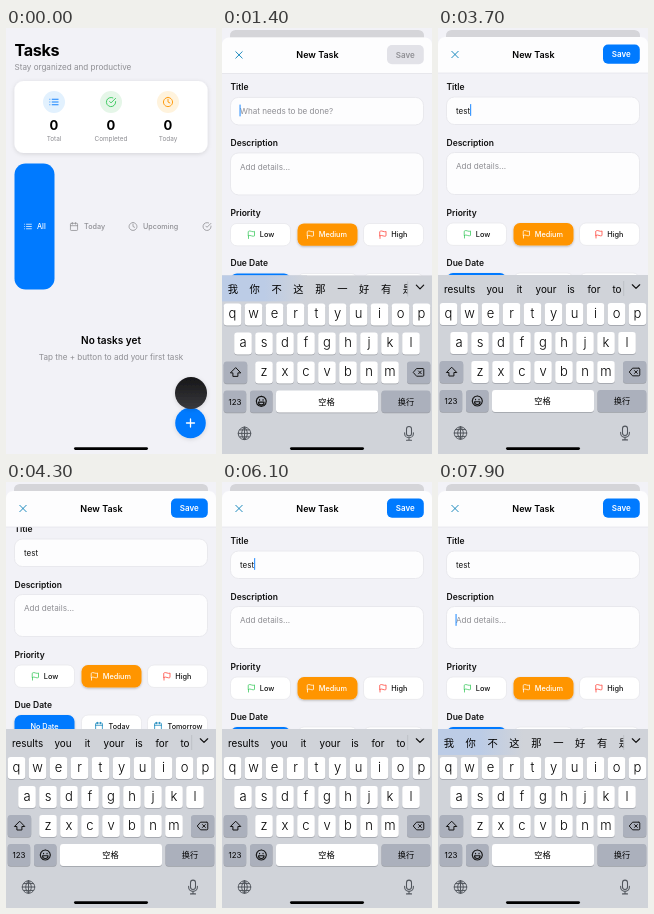
An HTML page for the animation above (8000 ms loop, 210 by 426 pixels).

```html
<!DOCTYPE html>
<html lang="en">
<head>
<meta charset="utf-8">
<title>Tasks</title>
<style>
  html, body { margin: 0; width: 100%; height: 100%; overflow: hidden; background: #f2f2f7; }
  svg { display: block; width: 100vw; height: 100vh; }
  text { font-family: Inter, "Noto Sans CJK SC", "Noto Sans CJK", sans-serif; white-space: pre; }
</style>
</head>
<body>
<svg id="stage" viewBox="0 0 210 426"></svg>
<script>
const BLUE = '#007aff', GREEN = '#34c759', ORANGE = '#ff9500', RED = '#ff3b30', GRAY = '#8e8e93';
const TEAL = '#0a80b8', KEYS_BG = '#d0d3d9', KEY_DARK = '#abb0bc';

const ring = 'M12 2a10 10 0 1 0 .01 0';
const icons = {
  list: 'M8 6h13M8 12h13M8 18h13M3 6h.01M3 12h.01M3 18h.01',
  check: 'M22 11v1a10 10 0 1 1-5.9-9.1M22 4 12 14l-3-3',
  clock: ring + 'M12 6v6l4 2',
  cal: 'M5 4h14a2 2 0 0 1 2 2v14a2 2 0 0 1-2 2H5a2 2 0 0 1-2-2V6a2 2 0 0 1 2-2M16 2v4M8 2v4M3 10h18',
  flag: 'M4 15s1-1 4-1 5 2 8 2 4-1 4-1V3s-1 1-4 1-5-2-8-2-4 1-4 1zM4 22v-7',
  close: 'M19 5 5 19M5 5l14 14',
  plus: 'M12 4v16M4 12h16',
  down: 'M4 8l8 8 8-8',
  globe: ring + 'M2 12h20M12 2v20M12 2c-6 6-6 14 0 20 6-6 6-14 0-20M4.5 6.5h15M4.5 17.5h15',
  mic: 'M12 1a4 4 0 0 0-4 4v7a4 4 0 0 0 8 0V5a4 4 0 0 0-4-4M5 11v1a7 7 0 0 0 14 0v-1M12 19v4M8 23h8',
  shift: 'M12 3 2 13h5v7h10v-7h5z',
  erase: 'M21 4H8l-7 8 7 8h13a2 2 0 0 0 2-2V6a2 2 0 0 0-2-2M18 9l-6 6M12 9l6 6',
  face: ring + 'M6.5 13.5h11a5.5 5.5 0 0 1-11 0M8.5 8.5v1M15.5 8.5v1'
};

// Markup helpers
const text = (s, x, y, size, fill = '#000', weight = 400, anchor = 'start', more = '') =>
  `<text x="${x}" y="${y}" font-size="${size}" fill="${fill}" font-weight="${weight}" text-anchor="${anchor}" ${more}>${s}</text>`;
const mid = (s, x, y, size, fill, weight) => text(s, x, y, size, fill, weight, 'middle');
const box = (x, y, w, h, r, fill, more = '') =>
  `<rect x="${x}" y="${y}" width="${w}" height="${h}" rx="${r}" fill="${fill}" ${more}/>`;
const dot = (x, y, r, fill, more = '') => `<circle cx="${x}" cy="${y}" r="${r}" fill="${fill}" ${more}/>`;
const icon = (name, x, y, size, color, width = 2) =>
  `<path d="${icons[name]}" transform="translate(${x - size / 2} ${y - size / 2}) scale(${size / 24})"
    fill="none" stroke="${color}" stroke-width="${width}" stroke-linecap="round" stroke-linejoin="round"/>`;
const field = (y, h) => box(8.5, y, 193, h, 8, '#fdfdfe', 'stroke="#e5e5ea" stroke-width=".8"');

function listPage() {
  const stat = (x, name, color, tint, label) =>
    dot(x, 74, 11, tint) + icon(name, x, 74, 11, color) +
    mid('0', x, 102, 13, '#000', 700) + mid(label, x, 113, 6.4, GRAY);
  const tab = (x, name, label) => icon(name, x, 198.5, 9.5, GRAY) + text(label, x + 10, 201, 7.2, GRAY, 500);
  return text('Tasks', 8.5, 28, 16.2, '#000', 700, 'start', 'letter-spacing="-.35"') +
    text('Stay organized and productive', 8.5, 42, 8.1, GRAY) +
    box(8.5, 53, 193, 72, 9, '#fff', 'filter="url(#soft)"') +
    stat(48, 'list', BLUE, '#e2f1fe', 'Total') +
    stat(105, 'check', GREEN, '#e5f6e8', 'Completed') +
    stat(162, 'clock', ORANGE, '#fff3dd', 'Today') +
    box(8.5, 135.5, 40, 126, 11, BLUE) + icon('list', 22, 198.5, 9, '#fff') +
    text('All', 31, 201, 7.2, '#fff', 500) +
    tab(68, 'cal', 'Today') + tab(127, 'clock', 'Upcoming') + tab(201, 'check', '') +
    mid('No tasks yet', 105, 316, 10, '#000', 600) +
    mid('Tap the + button to add your first task', 105, 332, 8.1, GRAY) +
    dot(184.5, 395, 15.3, BLUE, 'filter="url(#soft)"') + icon('plus', 184.5, 395, 12, '#fff', 2.6) +
    dot(185, 365, 16, 'url(#dark)', 'filter="url(#soft)"');
}

function form() {
  const label = (s, y) => text(s, 8.5, y, 8.5, '#111', 600);
  const chip = (x, y, fill) => box(x, y, 60, 22.4, 6.5, fill,
    fill === '#fff' ? 'stroke="#e5e5ea" stroke-width=".7"' : 'filter="url(#lift)"');
  const priority = (x, iconX, name, color, on) =>
    chip(x, 195, on ? ORANGE : '#fff') + icon('flag', iconX, 206.3, 9, color) +
    text(name, iconX + 8.3, 208.8, 7.3, on ? '#fff' : '#111', 500);
  const due = (x, iconX, name) =>
    chip(x, 245, '#fff') + icon('cal', iconX, 256, 9, TEAL) + text(name, iconX + 9.5, 258.5, 7.2, '#111', 500);
  return label('Title', 62) + field(69, 27.5) +
    text('What needs to be done?', 18, 85.5, 8.1, GRAY, 400, 'start', 'id="hint"') +
    text('', 18, 85.5, 8, '#111', 400, 'start', 'id="typed"') +
    label('Description', 118) + field(124.5, 42) + text('Add details...', 18, 141.3, 8.15, GRAY) +
    box(18, 76, .9, 12, .4, BLUE, 'id="caret"') +
    label('Priority', 188) + priority(8.5, 29.5, 'Low', GREEN) +
    priority(75.5, 88.5, 'Medium', '#fff', true) + priority(141.5, 161, 'High', RED) +
    label('Due Date', 237.9) + chip(8.5, 245, BLUE) +
    mid('No Date', 38.5, 258.5, 7.3, '#fff', 500) + due(75.5, 93, 'Today') + due(141.5, 152, 'Tomorrow');
}

function header() {
  return '<path d="M0 45V16a7 7 0 0 1 7-7H203a7 7 0 0 1 7 7V45z" fill="#fdfdfe"/>' +
    box(0, 44.7, 210, .6, 0, '#dedee3') + icon('close', 17, 26.5, 11, TEAL) +
    mid('New Task', 95.5, 30, 9, '#000', 600) +
    box(165, 16.6, 36.8, 19.2, 5, BLUE, 'id="save"') +
    text('Save', 183.2, 29.1, 8, '#fff', 600, 'middle', 'id="saveText"');
}

function keyboard() {
  const key = (x, y, w, fill = '#fff') => box(x, y + .8, w, 22, 3, '#9b9ea5') + box(x, y, w, 22, 3, fill);
  const row = (letters, x, y) => [...letters].map((c, i) =>
    key(x + 21 * i - 8.8, y, 17.6) + mid(c, x + 21 * i, y + 14.8, 13, '#000', 300)).join('');
  const words = (list, xs) => list.map((w, i) => mid(w, xs[i], 264.6, 9.9)).join('');
  const chinese = [...'我你不这那一好有是'].map((c, i) => mid(c, 10.8 + 21.9 * i, 265, 10.3)).join('');
  return box(0, 247, 210, 179, 0, KEYS_BG) +
    `<g id="chinese">${box(0, 247, 85, 26, 0, 'url(#glow)')}${chinese}</g>` +
    `<g id="english">${words(['results', 'you', 'it', 'your', 'is', 'for', 'to'], [21.5, 57, 81.5, 108, 133, 156, 179])}</g>` +
    box(185.5, 248, 25, 26, 0, KEYS_BG) + box(185.5, 253, .6, 15, 0, '#b2b5bb') +
    icon('down', 198, 258.6, 11, '#111', 2.6) +
    row('qwertyuiop', 10.5, 275) + row('asdfghjkl', 21, 304) + row('zxcvbnm', 42, 333) +
    key(1.7, 333, 23.5, KEY_DARK) + icon('shift', 13.4, 344, 12, '#111') +
    key(185, 333, 23.3, KEY_DARK) + icon('erase', 196.5, 344, 11.5, '#111') +
    key(1.7, 362, 22.5, KEY_DARK) + mid('123', 13, 376.2, 8) +
    key(28, 362, 22.5, KEY_DARK) + icon('face', 39.3, 373, 12, '#111', 2.3) +
    key(54, 362, 102, '#fff') + mid('空格', 104.5, 376.2, 8.2) +
    key(159.5, 362, 48.8, KEY_DARK) + mid('换行', 184, 376.2, 8.2) +
    icon('globe', 22.5, 405, 15, '#50555c', 1.6) + icon('mic', 187, 405, 15, '#50555c', 1.7);
}

const $ = id => document.getElementById(id);
const shadow = (id, spread, opacity) => `
  <filter id="${id}" x="-30%" y="-30%" width="160%" height="170%">
    <feDropShadow dx="0" dy="1" stdDeviation="${spread}" flood-color="#000" flood-opacity="${opacity}"/>
  </filter>`;
$('stage').innerHTML = `
  <defs>
    ${shadow('soft', 2, .13)}${shadow('lift', 1, .25)}
    <linearGradient id="dark" x2="0" y2="1"><stop stop-color="#161618"/><stop offset="1" stop-color="#3a3a3d"/></linearGradient>
    <linearGradient id="glow"><stop stop-color="#bccce6"/><stop offset=".5" stop-color="#bccce6"/><stop offset="1" stop-color="${KEYS_BG}"/></linearGradient>
    <clipPath id="card"><rect id="cardEdge" width="210" height="460"/></clipPath>
  </defs>
  <rect width="210" height="426" fill="#f2f2f7"/>
  <g id="page"><g clip-path="url(#card)">
    ${box(0, 0, 210, 460, 0, '#f2f2f7')}<g id="list">${listPage()}</g>
    ${box(0, 0, 210, 460, 0, '#000', 'id="dim"')}
  </g></g>
  <g id="sheet">
    ${box(0, 9, 210, 440, 7, '#f2f2f7')}<g id="form">${form()}</g>${header()}
  </g>
  <g id="keys">${keyboard()}</g>
  ${box(68, 419.2, 74, 2.8, 1.4, '#000')}`;

const LOOP = 8000, SHEET_AT = 905, KEYS_AT = 950, SWITCH_AT = 7450;
const TYPE_AT = 1900, TYPE_STEP = 200, WORD = 'test';

// Remaining distance (1 to 0) of a critically damped spring
const spring = ms => {
  const k = Math.max(0, ms) * .0186;
  return (1 + k) * Math.exp(-k);
};
const ease = (t, from, to) => {
  const k = Math.min(1, Math.max(0, (t - from) / (to - from)));
  return k * k * (3 - 2 * k);
};
const show = (id, on) => $(id).setAttribute('visibility', on ? 'visible' : 'hidden');
const move = (id, y) => $(id).setAttribute('transform', `translate(0 ${y.toFixed(2)})`);

function draw(t) {
  const left = spring(t - SHEET_AT), up = 1 - left;
  $('page').setAttribute('transform', `translate(${8 * up} ${2 * up}) scale(${1 - .0762 * up})`);
  $('cardEdge').setAttribute('rx', 6 * up);
  $('dim').setAttribute('opacity', .12 * up);
  move('list', 34 * up);
  move('sheet', 418 * left);
  move('keys', 179 * spring(t - KEYS_AT));
  show('sheet', t > SHEET_AT);
  show('keys', t > KEYS_AT);
  move('form', -39.5 * (ease(t, 4100, 4650) - ease(t, 5400, 5950)));

  const count = Math.min(WORD.length, Math.max(0, Math.floor((t - TYPE_AT) / TYPE_STEP) + 1));
  const filled = count > 0, inDetails = t >= SWITCH_AT;
  $('typed').textContent = WORD.slice(0, count);
  $('hint').setAttribute('opacity', filled ? 0 : 1);
  $('save').setAttribute('fill', filled ? BLUE : '#e2e2e8');
  $('saveText').setAttribute('fill', filled ? '#fff' : GRAY);
  const english = count === WORD.length && !inDetails;
  $('english').setAttribute('opacity', english ? 1 : 0);
  $('chinese').setAttribute('opacity', english ? 0 : 1);

  const caret = $('caret'), phase = t % 1000;
  caret.setAttribute('x', inDetails || !filled ? 17.6 : 18.2 + $('typed').getComputedTextLength());
  caret.setAttribute('y', inDetails ? 132 : 76);
  caret.setAttribute('opacity', t > 3000 && !inDetails && phase > 250 && phase < 600 ? 0 : 1);
}

const start = performance.now();
function tick() {
  draw((performance.now() - start) % LOOP);
  requestAnimationFrame(tick);
}
tick();
</script>
</body>
</html>
```
